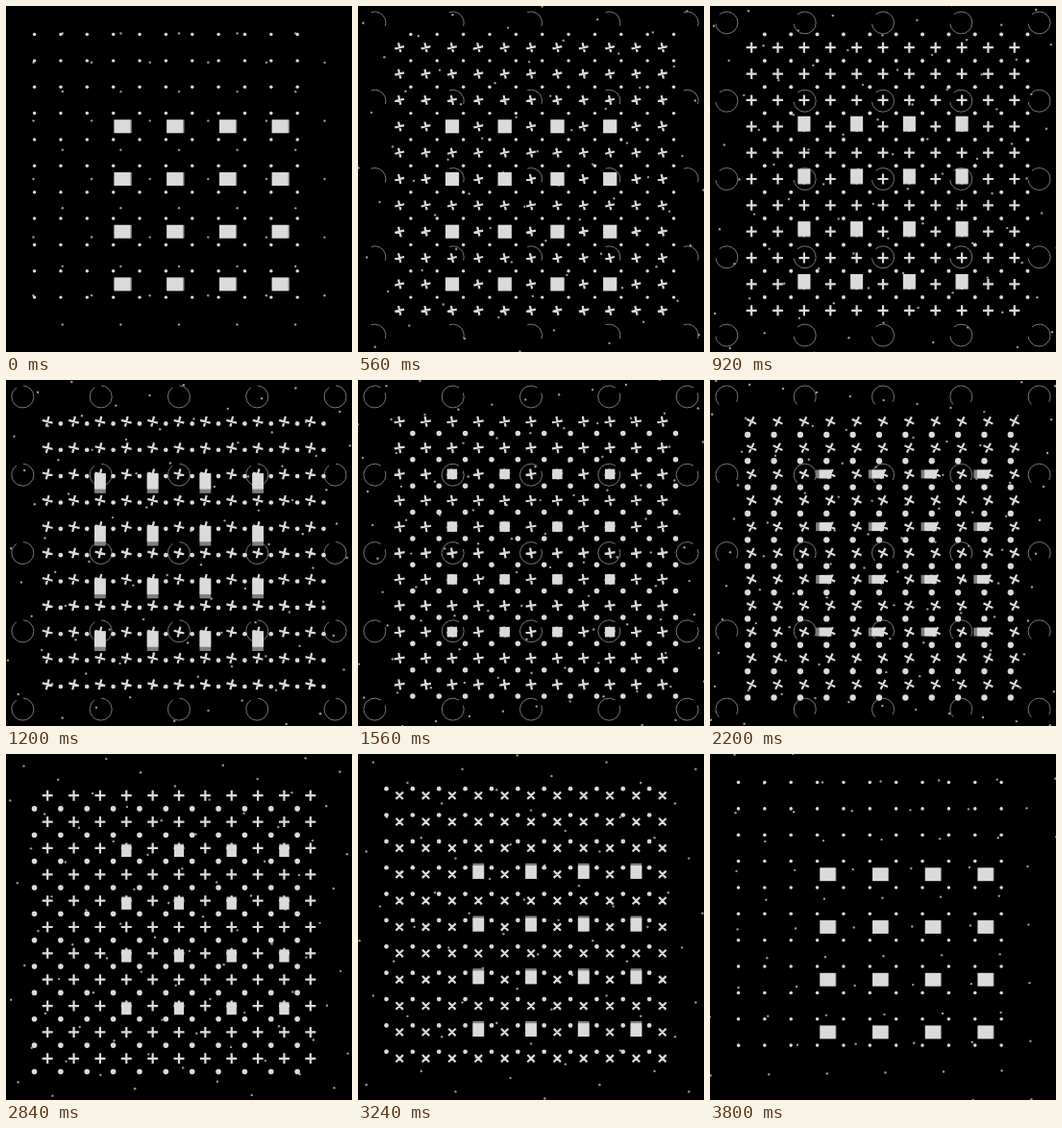
Write an HTML page with a canvas that moves like this. It is 360 by 360 pixels and loops after 3.84 s.

```html
<!DOCTYPE html>
<html>
<head>
<meta charset="utf-8">
<style>
html, body { margin: 0; height: 100%; overflow: hidden; background: #000; }
canvas { display: block; width: 360px; height: 360px; }
</style>
</head>
<body>
<canvas id="stage" width="360" height="360"></canvas>
<script>
const ctx = document.getElementById('stage').getContext('2d');
const LOOP = 3840, CENTER = 180, CELL = 27.36, TAU = Math.PI * 2;
const LIGHT = '#dadada';

const clamp = x => Math.min(1, Math.max(0, x));
const inOut = (x, g) => {
  x = clamp(x);
  return x < 0.5 ? 0.5 * (2 * x) ** g : 1 - 0.5 * (2 - 2 * x) ** g;
};
const outCubic = x => 1 - (1 - x) ** 3;
const mod4 = x => ((x % 4) + 4) % 4;

// Eases within every unit of x, so motion happens one leg at a time.
const legs = (x, ease) => Math.floor(x) + ease(x - Math.floor(x));

// One coordinate of a trip around a unit square: 1 -> 0, rest, 0 -> 1, rest.
const lane = x => {
  x = mod4(x);
  return x < 2 ? 1 - Math.min(x, 1) : Math.min(x - 2, 1);
};

function grid(from, to, step, draw) {
  for (let j = from; j <= to; j++)
    for (let i = from; i <= to; i++)
      draw(CENTER + i * step, CENTER + j * step);
}

function dot(x, y, r) {
  ctx.beginPath();
  ctx.arc(x, y, r, 0, TAU);
  ctx.fill();
}

function drawStars(t) {
  const step = 30.3 - 5.6 * inOut(1 - Math.abs(1 - 2 * t), 2.5);
  const a = t * TAU / 4, cos = Math.cos(a), sin = Math.sin(a);
  ctx.fillStyle = '#999';
  for (let j = -11; j <= 11; j++)
    for (let i = -11; i <= 11; i++)
      if ((i + j) & 1)
        dot(CENTER + step * (i * cos - j * sin), CENTER + step * (i * sin + j * cos), 1.2);
}

// Arcs that open and close while spinning twice per loop.
function drawRings(t) {
  const sweep = 0.9 * TAU * Math.min(inOut((t - 0.04) / 0.24, 2), inOut((0.72 - t) / 0.22, 2));
  if (!sweep) return;
  const mid = TAU * (2 * t - 0.42);
  ctx.strokeStyle = '#777';
  ctx.lineWidth = 1;
  grid(-2, 2, 81.3, (x, y) => {
    ctx.beginPath();
    ctx.arc(x, y, 11.5, mid - sweep / 2, mid + sweep / 2);
    ctx.stroke();
  });
}

function drawCrosses(t, turn) {
  const arm = 5.5 * inOut((Math.min(t, 1 - t) - 0.02) / 0.16, 2);
  if (!arm) return;
  const a = turn * TAU / 2, c = arm * Math.cos(a), s = arm * Math.sin(a);
  ctx.strokeStyle = LIGHT;
  ctx.lineWidth = 2.2;
  ctx.beginPath();
  grid(-5, 5, CELL, (x, y) => {
    ctx.moveTo(x - c, y - s);
    ctx.lineTo(x + c, y + s);
    ctx.moveTo(x + s, y - c);
    ctx.lineTo(x - s, y + c);
  });
  ctx.stroke();
}

function drawDots(turn, swell) {
  const r = 2.4 - 0.75 * swell;
  const dx = (0.5 - lane(turn)) * CELL, dy = (0.5 - lane(turn - 1)) * CELL;
  ctx.fillStyle = LIGHT;
  grid(-5, 5, CELL, (x, y) => dot(x + dx, y + dy, r));
}

// The leading edge runs ahead of the trailing one, stretching each block.
function drawBlocks(t, swell) {
  const size = 11.5 + 2.6 * swell;
  const edge = lag => legs(4 * t + 0.3 - lag, x => inOut(x / 0.95, 3));
  const span = (a, b) => [Math.min(a, b) * CELL, Math.abs(a - b) * CELL + size];
  const lead = edge(-0.057);
  const layer = (color, lag) => {
    const trail = edge(lag);
    const [x0, w] = span(lane(lead), lane(trail));
    const [y0, h] = span(lane(lead - 1), lane(trail - 1));
    ctx.fillStyle = color;
    for (let j = -3; j <= 3; j += 2)
      for (let i = -3; i <= 3; i += 2)
        ctx.fillRect(CENTER + i * CELL + x0 - size / 2, CENTER + j * CELL + y0 - size / 2, w, h);
  };
  layer('#808080', 0.08);
  layer(LIGHT, 0.025);
}

function draw() {
  const t = performance.now() % LOOP / LOOP;
  const turn = legs(4 * t, outCubic);
  const swell = Math.cos(TAU * (t - 0.08));
  ctx.fillStyle = '#000';
  ctx.fillRect(0, 0, 360, 360);
  drawStars(t);
  drawRings(t);
  drawBlocks(t, swell);
  drawCrosses(t, turn);
  drawDots(turn, swell);
  requestAnimationFrame(draw);
}
draw();
</script>
</body>
</html>
```
